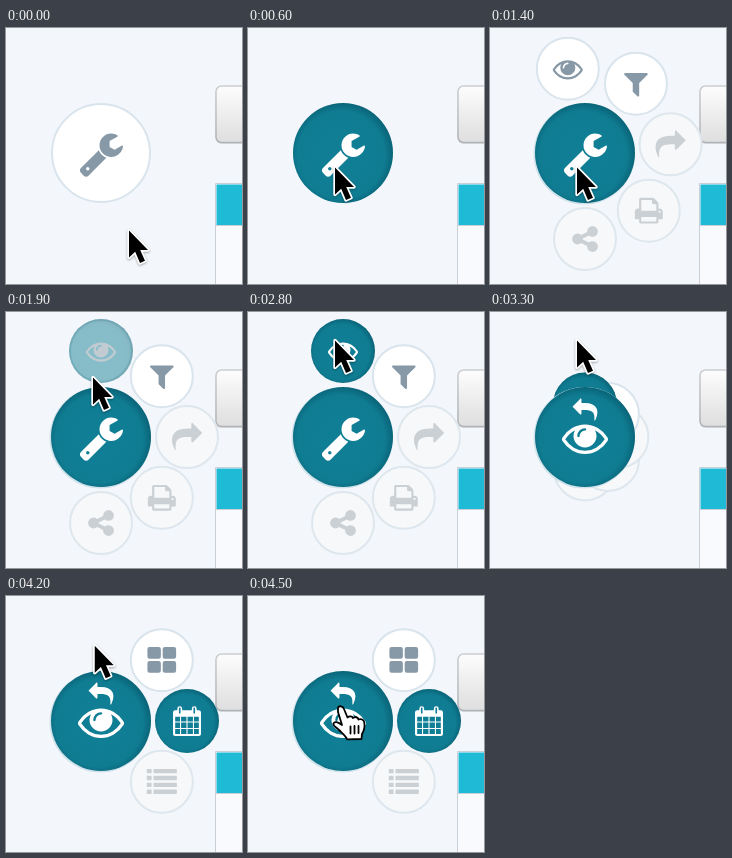
Write an HTML page that moves like this. It is 236x256 px and loops after 5100 ms.

```html
<!DOCTYPE html>
<html lang="en">
<head>
<meta charset="utf-8">
<title>Radial menu</title>
<style>
  html, body { margin: 0; width: 100%; height: 100%; overflow: hidden; background: #f3f7fc; }
  svg { display: block; width: 236px; height: 256px; }
  .disc { fill: #fff; stroke: #d9e4ec; stroke-width: 2; }
  .off .disc { fill: #f7f8f9; stroke: #dee7ed; }
  .icon { fill: #8798a6; fill-rule: evenodd; }
  .off .icon { fill: #cbd0d5; }
  .on .icon { fill: #fff; }
  .arrow { fill: #000; stroke: #fff; stroke-width: 3.4; stroke-linejoin: round; paint-order: stroke; filter: drop-shadow(0 1px 1px #0005); }
  .hand { fill: #fff; stroke: #000; stroke-width: 1.8; stroke-linejoin: round; stroke-linecap: round; }
</style>
</head>
<body>
<svg viewBox="0 0 236 256">
  <defs>
    <radialGradient id="teal" cx=".48" cy=".52" r=".52">
      <stop offset="0" stop-color="#107f96"/>
      <stop offset=".84" stop-color="#0f7c92"/>
      <stop offset="1" stop-color="#0a6579"/>
    </radialGradient>
    <linearGradient id="button" x2="0" y2="1">
      <stop offset="0" stop-color="#fdfdfd"/>
      <stop offset="1" stop-color="#dedede"/>
    </linearGradient>
    <linearGradient id="rim" x2="0" y2="1">
      <stop offset="0" stop-color="#cbcdd0"/>
      <stop offset="1" stop-color="#b0b2b5"/>
    </linearGradient>
  </defs>
  <rect x="209.500" y="59" width="50" height="57" rx="6" fill="#d9dde3"/>
  <rect x="210" y="58" width="50" height="56.500" rx="5.500" fill="url(#button)" stroke="url(#rim)" stroke-width="1.500"/>
  <path d="M209.500 155.500h30v110h-30z" fill="#f8fafd" stroke="#c9cfd6"/>
  <path d="M210.500 156.500h30v40.500h-30z" fill="#1fbad5"/>
  <path d="M210 197.500h30" stroke="#c9cfd6"/>
  <g id="menu"></g>
  <g id="main"></g>
  <path id="arrow" class="arrow" d="M1 1.500V28.500L7.200 22.800 12 34 17 31.800 12.200 21H20Z"/>
  <g id="hand" class="hand">
    <path d="M-3-.5C-2-2.500 2-2 3 1L6.500 9.500C8 8 11 8 12 10 14 8.500 17 9 17.500 11.500 20 10.500 23 11.500 23.300 14.500 24 19 23.500 22 21 26L20.500 31 6 31.300C5 28 1 25 -2 22-5 19-8.500 17.500-7.500 15.500-6.500 13-3 14 1 17L-3 4Z"/>
    <path d="M9.500 18.500V25.500M13.500 18V25.500M17.500 18V25"/>
  </g>
</svg>
<script>
const LOOP = 5100, STEP = 100, CX = 95, CY = 125, R = 86;
const $ = id => document.getElementById(id);

const cells = () => {
  const cols = [[192, 288], [544, 320], [928, 320], [1312, 288]];
  const rows = [[640, 288], [992, 320], [1376, 288]];
  return rows.map(([y, h]) => cols.map(([x, w]) => `M${x} ${y}h${w}v${h}h${-w}z`).join('')).join('');
};
const box = (x, y, w, h, r) =>
  `M${x + r} ${y}h${w - 2 * r}a${r} ${r} 0 0 1 ${r} ${r}v${h - 2 * r}a${r} ${r} 0 0 1 ${-r} ${r}` +
  `h${2 * r - w}a${r} ${r} 0 0 1 ${-r} ${-r}v${2 * r - h}a${r} ${r} 0 0 1 ${r} ${-r}z`;
const tab = x => `M${x} 256v-96a144 144 0 0 1 288 0v96z` + box(x + 96, 96, 96, 352, 30);

// All icons use a 1792-unit square.
const ICONS = {
  wrench: 'M448 1472q0-26-19-45t-45-19-45 19-19 45 19 45 45 19 45-19 19-45zm644-420l-682 682q-37 37-90 37-52 0-91-37l-106-108q-38-36-38-90 0-53 38-91l681-681q39 98 114.500 173.500t173.500 114.500zm634-435q0 39-23 106-47 134-164.500 217.500t-258.500 83.500q-185 0-316.500-131.500t-131.500-316.500 131.500-316.500 316.500-131.500q58 0 121.500 16.500t107.500 46.500q16 11 16 28t-16 28l-293 169v224l193 107q5-3 79-48.500t135.500-81 70.500-35.500q15 0 23.500 10t8.500 25z',
  eye: 'M1664 960q-152-236-381-353 61 104 61 225 0 185-131.500 316.500t-316.500 131.500-316.500-131.500-131.500-316.500q0-121 61-225-229 117-381 353 133 205 333.500 326.500t434.500 121.500 434.500-121.500 333.500-326.500zm-720-384q0-20-14-34t-34-14q-125 0-214.500 89.500t-89.500 214.500q0 20 14 34t34 14 34-14 14-34q0-86 61-147t147-61q20 0 34-14t14-34zm848 384q0 34-20 69-140 230-376.500 368.500t-499.500 138.500-499.500-139-376.500-368q-20-35-20-69t20-69q140-229 376.500-368t499.500-139 499.500 139 376.500 368q20 35 20 69z',
  filter: 'M1595 295q17 41-14 70l-493 493v742q0 42-39 59-13 5-25 5-27 0-45-19l-256-256q-19-19-19-45v-486l-493-493q-31-29-14-70 17-39 59-39h1280q42 0 59 39z',
  forward: 'M1792 640q0 26-19 45l-512 512q-19 19-45 19t-45-19-19-45v-256h-224q-98 0-175.500 6t-154 21.500-133 42.500-105.500 69.500-80 101-48.500 138.500-17.500 181q0 55 5 123 0 6 2.500 23.500t2.500 26.500q0 15-8.500 25t-23.500 10q-16 0-28-17-7-9-13-22t-13.500-30-10.500-24q-127-285-127-451 0-199 53-333 162-403 875-403h224v-256q0-26 19-45t45-19 45 19 19 45l512 512q19 19 19 45z',
  print: 'M448 1536h896v-256h-896v256zm0-640h896v-384h-160q-40 0-68-28t-28-68v-160h-640v640zm1152 64q0-26-19-45t-45-19-45 19-19 45 19 45 45 19 45-19 19-45zm128 0v416q0 13-9.500 22.500t-22.500 9.500h-224v160q0 40-28 68t-68 28h-960q-40 0-68-28t-28-68v-160h-224q-13 0-22.500-9.500t-9.500-22.500v-416q0-79 56.500-135.500t135.500-56.500h64v-544q0-40 28-68t68-28h672q40 0 88 20t76 48l152 152q28 28 48 76t20 88v256h64q79 0 135.500 56.500t56.500 135.500z',
  share: 'M1344 1024q133 0 226.500 93.500t93.500 226.500-93.500 226.500-226.500 93.500-226.500-93.500-93.500-226.500q0-12 2-34l-360-180q-92 86-218 86-133 0-226.500-93.500t-93.500-226.500 93.500-226.500 226.500-93.500q126 0 218 86l360-180q-2-22-2-34 0-133 93.500-226.500t226.500-93.500 226.500 93.500 93.500 226.500-93.500 226.500-226.500 93.500q-126 0-218-86l-360 180q2 22 2 34t-2 34l360 180q92-86 218-86z',
  grid: [40, 948].map(x => [110, 946].map(y => box(x, y, 800, 700, 130)).join('')).join(''),
  calendar: box(64, 256, 1664, 1536, 128) + cells() + tab(320) + tab(1184),
  list: [130, 540, 950, 1360].map(y => box(0, y, 290, 260, 40) + box(400, y, 1392, 260, 40)).join('')
};

const icon = (name, x, y, s, flip = 1) =>
  `<path class="icon" d="${ICONS[name]}" transform="translate(${x} ${y}) scale(${s * flip} ${s}) translate(-896 -896)"/>`;
const teal = r => `<circle r="${r}" fill="url(#teal)"/>`;

// Drawn first to last, so the eye lies on top.
const items = [
  { name: 'list', angle: 45, sub: 1, off: 1 },
  { name: 'calendar', angle: 0, sub: 1, lit: 1 },
  { name: 'grid', angle: -45, sub: 1 },
  { name: 'share', angle: 90, off: 1 },
  { name: 'print', angle: 45, off: 1 },
  { name: 'forward', angle: 0, off: 1 },
  { name: 'filter', angle: -45 },
  { name: 'eye', angle: -90 }
];

$('menu').innerHTML = items.map(({ name, off }) => {
  const pic = icon(name, 0, 0, .0168);
  return `<g class="${off ? 'off' : ''}"><circle class="disc" r="31"/>${pic}<g class="on">${teal(32)}${pic}</g></g>`;
}).join('');
items.forEach((item, i) => {
  item.el = $('menu').children[i];
  item.on = item.el.querySelector('.on');
});

const wrench = icon('wrench', .2, .7, .0262);
$('main').innerHTML = `<circle class="disc" r="49"/>${wrench}
  <circle id="ring" cx="-.8" cy=".9" r="50.7" fill="#d0e2ea"/>
  <g id="lit" class="on">${teal(50)}<g id="tool">${wrench}</g>
  <g id="back">${icon('eye', 0, .6, .0257)}${icon('forward', 0, -27, .0138, -1)}</g></g>`;
$('main').setAttribute('transform', `translate(${CX} ${CY})`);

const clamp = v => Math.min(1, Math.max(0, v));
const span = (t, a, b) => clamp((t - a) / (b - a));
const lerp = (a, b, p) => a + (b - a) * p;
const inBack = p => p * p * (2.70158 * p - 1.70158);
const outBack = p => 1 - inBack(1 - p);
const show = (el, on) => el.setAttribute('visibility', on ? 'visible' : 'hidden');
const move = (el, x, y) => el.setAttribute('transform', `translate(${x.toFixed(2)} ${y.toFixed(2)})`);

// Pointer stops: time, x, y
const STOPS = [[0, 122, 201], [600, 86, 138], [1700, 86, 138], [2000, 86, 27], [4100, 86, 27], [4500, 93, 112], [LOOP, 93, 112]];
function pointer(t) {
  const i = Math.max(1, STOPS.findIndex(s => s[0] >= t));
  const [t0, x0, y0] = STOPS[i - 1], [t1, x1, y1] = STOPS[i];
  const p = span(t, t0, t1);
  return [lerp(x0, x1, p), lerp(y0, y1, p)];
}

function draw(t) {
  const fan = outBack(span(t, 950, 1550));
  const reach = R * span(t, 950, 1400) * (1 - inBack(span(t, 3100, 3320)));
  const subReach = R * outBack(span(t, 3290, 3890));
  for (const { name, angle, sub, lit, el, on } of items) {
    const r = sub ? subReach : reach;
    const a = (sub ? angle : lerp(90, angle, fan)) * Math.PI / 180;
    move(el, CX + r * Math.cos(a), CY + r * Math.sin(a));
    show(el, r > 1);
    on.setAttribute('opacity', lit ? 1 : name === 'eye' ? span(t, 1800, 2000) : 0);
  }

  $('lit').setAttribute('opacity', span(t, 300, 600));
  show($('ring'), t >= 1000);
  show($('tool'), t < 3200);
  show($('back'), t >= 3200);

  const [x, y] = pointer(t), hand = t >= 4400;
  show($('arrow'), !hand);
  show($('hand'), hand);
  move($('arrow'), x, y);
  move($('hand'), x, y);
}

const start = performance.now();
function frame(now) {
  const t = Math.max(0, now - start) + 20;
  draw(Math.floor(t % LOOP / STEP) * STEP);
  requestAnimationFrame(frame);
}
draw(0);
requestAnimationFrame(frame);
</script>
</body>
</html>
```
